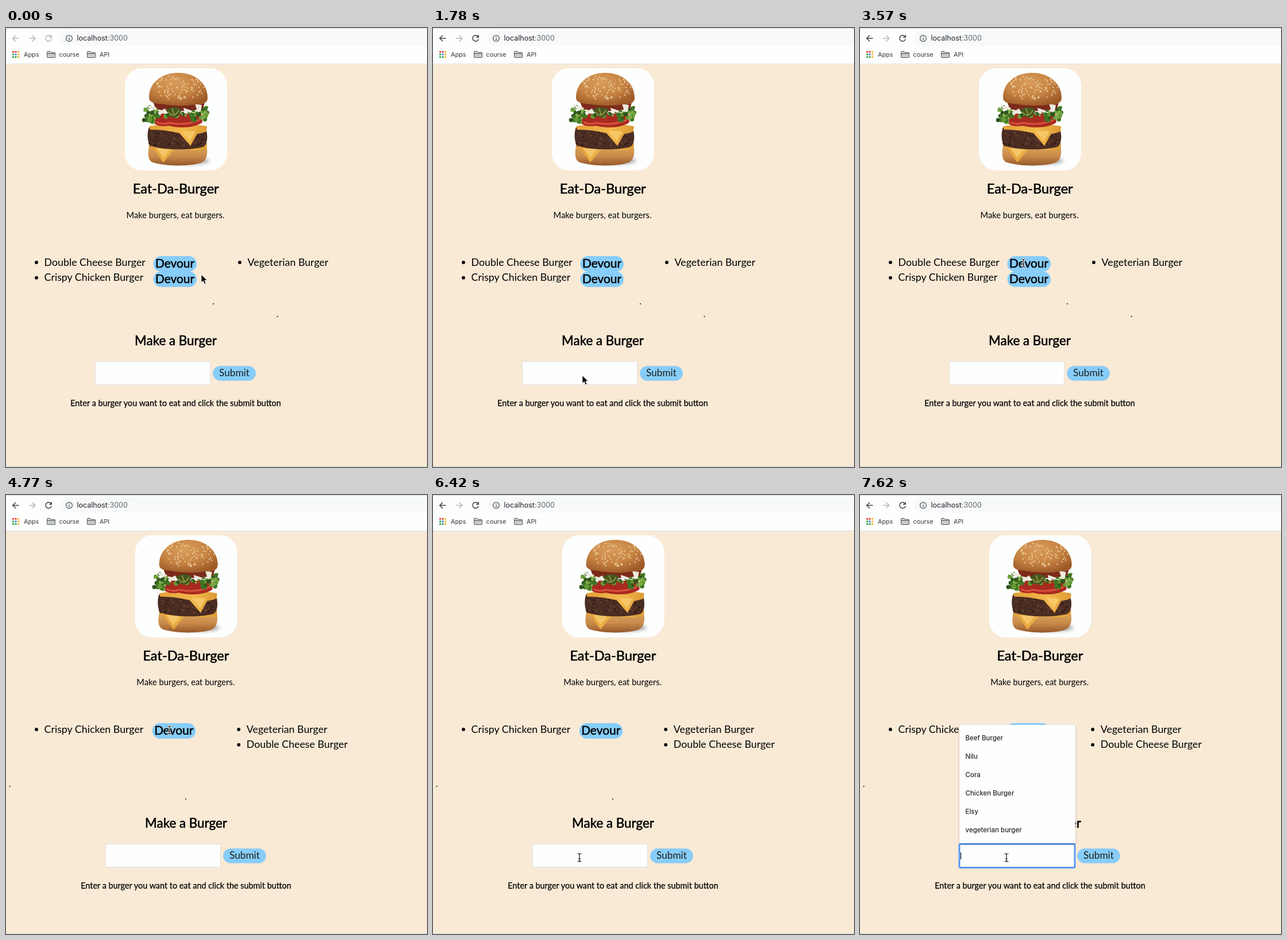
An HTML page for the animation above (8000 ms loop, 733x764 px).

```html
<!DOCTYPE html>
<html lang="en">
<head>
<meta charset="utf-8">
<title>Burger list</title>
<style>
  html, body { margin: 0; width: 100%; height: 100%; overflow: hidden; background: #f9ead6; }
  svg { display: block; width: 733px; height: 764px; }
  .page { font-family: Lato, "Open Sans", sans-serif; }
  .ui { font-family: Inter, Roboto, sans-serif; }
  .mid { text-anchor: middle; }
  .heavy { stroke: #000; stroke-width: 0.55px; }
  .item { font-size: 17.8px; }
</style>
</head>
<body>
<svg viewBox="0 0 733 764">
  <defs>
    <radialGradient id="bun" cx="0.42" cy="0.3" r="0.72">
      <stop offset="0" stop-color="#d99d5c"/>
      <stop offset="0.55" stop-color="#c88443"/>
      <stop offset="1" stop-color="#9d5a28"/>
    </radialGradient>
    <linearGradient id="heel" x1="0" y1="0" x2="0" y2="1">
      <stop offset="0" stop-color="#dca860"/>
      <stop offset="0.55" stop-color="#c98a4a"/>
      <stop offset="1" stop-color="#95592c"/>
    </linearGradient>
    <linearGradient id="cheese" x1="0" y1="0" x2="1" y2="0">
      <stop offset="0" stop-color="#e3a03a"/>
      <stop offset="0.6" stop-color="#f2b84a"/>
      <stop offset="1" stop-color="#dc9a35"/>
    </linearGradient>
    <filter id="soft" x="-50%" y="-100%" width="200%" height="300%"><feGaussianBlur stdDeviation="3"/></filter>
    <filter id="lift" x="-10%" y="-10%" width="120%" height="120%">
      <feDropShadow dx="0" dy="1" stdDeviation="1.5" flood-color="#000" flood-opacity="0.3"/>
    </filter>
  </defs>

  <rect width="733" height="764" fill="#f9ead6"/>
  <rect y="762.5" width="733" height="1.5" fill="#dcdcde"/>

  <g class="ui">
    <rect width="733" height="62.5" fill="#fdfefe"/>
    <rect width="733" height="1.5" fill="#dfe2e5"/>
    <rect y="62" width="733" height="1" fill="#dcdee0"/>
    <rect x="94" y="4" width="680" height="27" rx="13.5" fill="#f7f9fa"/>
    <g fill="none" stroke-width="1.5">
      <path class="nav" d="M22.5 18H12M17 12.7L11.7 18L17 23.3"/>
      <path stroke="#b4b7ba" d="M40 18H50.5M45.5 12.7L50.8 18L45.5 23.3"/>
      <path class="nav" d="M78.3 14.7A5.2 5.2 0 1 0 79.2 19.2M79.3 12.2V16.3H75"/>
      <circle cx="110" cy="18" r="5.4" stroke="#55595d" stroke-width="1.3"/>
      <path stroke="#55595d" d="M110 17.3V21M110 14.7V16.1"/>
    </g>
    <text x="123.5" y="22.3" font-size="12.5" fill="#202327">localhost<tspan fill="#63676b">:3000</tspan></text>
    <g id="apps"></g>
    <g font-size="10.8" fill="#33363a">
      <text x="31" y="50">Apps</text>
      <text x="92.5" y="50">course</text>
      <text x="163" y="50">API</text>
    </g>
    <g id="folders" fill="#c9cbcd" stroke="#55585b"></g>
  </g>

  <g class="page">
    <g id="hero">
      <rect x="207" y="70" width="178" height="178" rx="30" fill="#fdfefe"/>
      <ellipse cx="318" cy="231" rx="36" ry="6" fill="#666" opacity="0.6" filter="url(#soft)"/>
      <path fill="url(#heel)" d="M249 205C246 222 248 231 256 234C278 241 318 241 338 235C350 231 352 219 349 203Z"/>
      <path fill="url(#cheese)" d="M249 203Q300 190 350 200L349 211Q330 215 310 211L292 212L274 234L257 211Q249 209 249 203Z"/>
      <path fill="#f4c468" d="M261 209L287 210L274 226Z"/>
      <path fill="#4a2d22" d="M249 173C245 182 246 201 252 205C275 213 322 213 343 207C351 203 352 188 348 175Z"/>
      <g id="grain"></g>
      <path fill="url(#cheese)" d="M249 171Q298 162 350 171L349 180Q340 184 333 184L321 205L302 183Q272 176 251 177Z"/>
      <path fill="#f6c766" d="M306 179L330 180L320 197Z"/>
      <path fill="#a92a20" d="M255 157C253 168 268 173 283 170C302 175 330 174 342 164L340 149H258Z"/>
      <path fill="none" stroke="#d9513f" stroke-width="3" d="M262 164Q271 169 284 165Q310 171 337 160"/>
      <g id="leaves"></g>
      <path fill="#7b2a1b" d="M255 126H347L343 140Q300 149 261 141Z"/>
      <path fill="#47561f" d="M278 143Q291 133 306 142Q300 160 287 154Z"/>
      <path fill="none" stroke="#8b9a42" stroke-width="2" d="M283 146Q292 159 301 143M289 140L293 152"/>
      <g fill="#ece9dc">
        <path d="M244 133L263 139L261 143L249 140Z"/>
        <path d="M264 147L277 140L279 144L267 152Z"/>
        <path d="M309 139L324 144L322 148L310 144Z"/>
        <path d="M329 132L341 134L339 145L334 147Z"/>
      </g>
      <path fill="url(#bun)" d="M249 121C249 95 271 78 300 78C331 78 352 98 351 123C350 131 342 133 331 133Q300 138 269 132C257 131 249 129 249 121Z"/>
      <g id="seeds" fill="#ecd0a0"></g>
      <text class="mid heavy" x="295.7" y="288" font-size="23.6">Eat-Da-Burger</text>
      <text class="mid" x="295" y="331" font-size="14.7">Make burgers, eat burgers.</text>
    </g>

    <g id="before"></g>
    <g id="after"></g>

    <g id="form">
      <text class="mid heavy" x="295.5" y="551.5" font-size="22.4">Make a Burger</text>
      <rect x="155.5" y="580.5" width="200" height="40" fill="#fdfefe" stroke="#e0dfdc"/>
      <rect x="360.4" y="588.4" width="74.2" height="25.2" rx="12.6" fill="#87cdfa" stroke="#9ccbea" stroke-width="0.8"/>
      <text class="mid" x="397.5" y="606.3" font-size="17.2" fill="#1c1c1c">Submit</text>
      <text class="mid" x="295.5" y="658" font-size="14.4" stroke="#000" stroke-width="0.25">Enter a burger you want to eat and click the submit button</text>
    </g>
  </g>

  <g id="suggest" class="ui">
    <rect x="173" y="607.5" width="201" height="41" rx="2" fill="#fdfefe" stroke="#5b97f5" stroke-width="3"/>
    <rect id="caret" x="175" y="622" width="1.2" height="12" fill="#111"/>
    <rect x="173" y="400" width="202" height="206" rx="2" fill="#fdfefe" filter="url(#lift)"/>
    <g id="options" font-size="11.5" font-weight="500" fill="#24272a"></g>
  </g>

  <path id="arrow" fill="#000" stroke="#fff" stroke-width="0.9" d="M0 0V14.2L3.3 11.2L5.6 16.6L8.1 15.5L5.8 10.3H10.2Z"/>
  <g id="beam" fill="none">
    <path stroke="#fff" stroke-width="3" d="M-3.5 -7Q0 -7 0 -5Q0 -7 3.5 -7M0 -5V5M-3.5 7Q0 7 0 5Q0 7 3.5 7M-2 2H2"/>
    <path stroke="#111" stroke-width="1.2" d="M-3.5 -7Q0 -7 0 -5Q0 -7 3.5 -7M0 -5V5M-3.5 7Q0 7 0 5Q0 7 3.5 7M-2 2H2"/>
  </g>
</svg>

<script>
const LOOP = 8000;
const $ = id => document.getElementById(id);
const show = (id, on) => $(id).setAttribute("display", on ? "inline" : "none");
const move = (id, x, y) => $(id).setAttribute("transform", `translate(${x} ${y})`);
const repeat = (n, make) => Array.from({ length: n }, (_, i) => make(i)).join("");

let seed = 7;
const random = () => (seed = (seed * 16807) % 2147483647) / 2147483647;
const between = (a, b) => a + (b - a) * random();

const bullet = (x, row, label) => {
  const y = 408 + row * 26.7;
  return `<circle cx="${x}" cy="${y}" r="2.9"/><text class="item" x="${x + 13.6}" y="${y + 5.5}">${label}</text>`;
};
const devour = (x, row) => {
  const y = 397 + row * 26.7;
  return `<rect x="${x}" y="${y}" width="75.5" height="27" rx="13.5" fill="#87cdfa"/>
    <text class="mid heavy" x="${x + 37.5}" y="${y + 20.3}" font-size="20.9">Devour</text>`;
};
const dot = (x, y) => `<circle cx="${x}" cy="${y}" r="1"/>`;

function buildScene() {
  const dotColors = ["#e8453c", "#e8453c", "#f2b634", "#34a853", "#4285f4", "#f2b634", "#34a853", "#34a853", "#f2b634"];
  $("apps").innerHTML = repeat(9, i =>
    `<rect x="${11 + (i % 3) * 4.5}" y="${40 + Math.floor(i / 3) * 4.5}" width="3" height="3" rx="0.6" fill="${dotColors[i]}"/>`);
  $("folders").innerHTML = [71.5, 141.5].map(x =>
    `<path d="M${x} 51V41.5Q${x} 40.5 ${x + 1} 40.5H${x + 5}L${x + 7} 42.5H${x + 13}Q${x + 14} 42.5 ${x + 14} 43.5V51Q${x + 14} 51.5 ${x + 13} 51.5H${x + 1}Q${x} 51.5 ${x} 51ZM${x} 44.5H${x + 14}"/>`).join("");

  $("seeds").innerHTML = repeat(85, () => {
    const angle = between(0, 2 * Math.PI), r = Math.sqrt(random());
    const x = 300 + 46 * r * Math.cos(angle), y = 103 + 22 * r * Math.sin(angle);
    return `<ellipse cx="${x}" cy="${y}" rx="0.9" ry="1.6" transform="rotate(${between(-50, 50)} ${x} ${y})"/>`;
  });
  $("grain").innerHTML = repeat(90, i =>
    `<circle cx="${between(250, 347)}" cy="${between(182, 205)}" r="${between(0.8, 2)}" fill="${["#2f1a16", "#6b4231", "#583327"][i % 3]}"/>`);
  const leaf = (x, y, i) =>
    `<circle cx="${x}" cy="${y}" r="${between(2, 4.5)}" fill="${["#3f7423", "#649a34", "#2d541c", "#7faa48"][i % 4]}"/>`;
  $("leaves").innerHTML =
    repeat(32, i => leaf(between(240, 262), between(136, 164), i)) +
    repeat(36, i => leaf(between(324, 351), between(136, 161), i)) +
    repeat(18, i => leaf(between(264, 325), between(144, 154), i));

  $("before").innerHTML =
    bullet(53, 0, "Double Cheese Burger") + bullet(53, 1, "Crispy Chicken Burger") +
    devour(256.5, 0) + devour(256.5, 1) +
    bullet(407, 0, "Vegeterian Burger") + dot(361, 480) + dot(472.5, 502);
  $("after").innerHTML =
    bullet(53, 0, "Crispy Chicken Burger") + devour(254.7, 0) +
    bullet(405.2, 0, "Vegeterian Burger") + bullet(405.2, 1, "Double Cheese Burger") +
    dot(6.5, 507) + dot(313, 529);

  const options = ["Beef Burger", "Nilu", "Cora", "Chicken Burger", "Elsy", "vegeterian burger"];
  $("options").innerHTML = options.map((label, i) => `<text x="183.5" y="${427.3 + 32 * i}">${label}</text>`).join("");
}

// The pointer advances in discrete hops along each leg.
const legs = [
  { start: 150, end: 1180, hops: 8, from: [340, 429], to: [258, 606] },
  { start: 1480, end: 1480, hops: 1, from: [258, 606], to: [260, 604.5] },
  { start: 2230, end: 2230, hops: 1, from: [260, 604.5], to: [260, 603] },
  { start: 2830, end: 3570, hops: 6, from: [260, 603], to: [284.5, 409] },
  { start: 5670, end: 6420, hops: 6, from: [284.5, 409], to: [255, 631] }
];

function pointerAt(t) {
  const leg = legs.filter(l => t >= l.start).pop();
  if (!leg) return legs[0].from;
  const gap = (leg.end - leg.start) / (leg.hops - 1) || 1;
  const hop = Math.min(leg.hops, Math.floor((t - leg.start) / gap + 0.001) + 1);
  const p = t >= leg.end ? 1 : hop / leg.hops;
  const eased = p * p * (3 - 2 * p);
  return leg.from.map((v, i) => v + (leg.to[i] - v) * eased);
}

function update(t) {
  const devoured = t >= 4770;
  const textCursor = t >= 2230;
  show("before", !devoured);
  show("after", devoured);
  move("hero", devoured ? 17.7 : 0, 0);
  move("form", devoured ? 18 : 0, devoured ? 27 : 0);
  show("suggest", t >= 6570);
  show("caret", t < 7020 || t >= 7620);
  document.querySelectorAll(".nav").forEach(icon =>
    icon.setAttribute("stroke", t >= 1780 ? "#3f4347" : "#b4b7ba"));

  const [x, y] = pointerAt(t);
  show("arrow", !textCursor);
  show("beam", textCursor);
  move(textCursor ? "beam" : "arrow", x, y);
}

buildScene();
const origin = performance.now();
function tick() {
  update((performance.now() - origin) % LOOP);
  requestAnimationFrame(tick);
}
tick();
</script>
</body>
</html>
```
